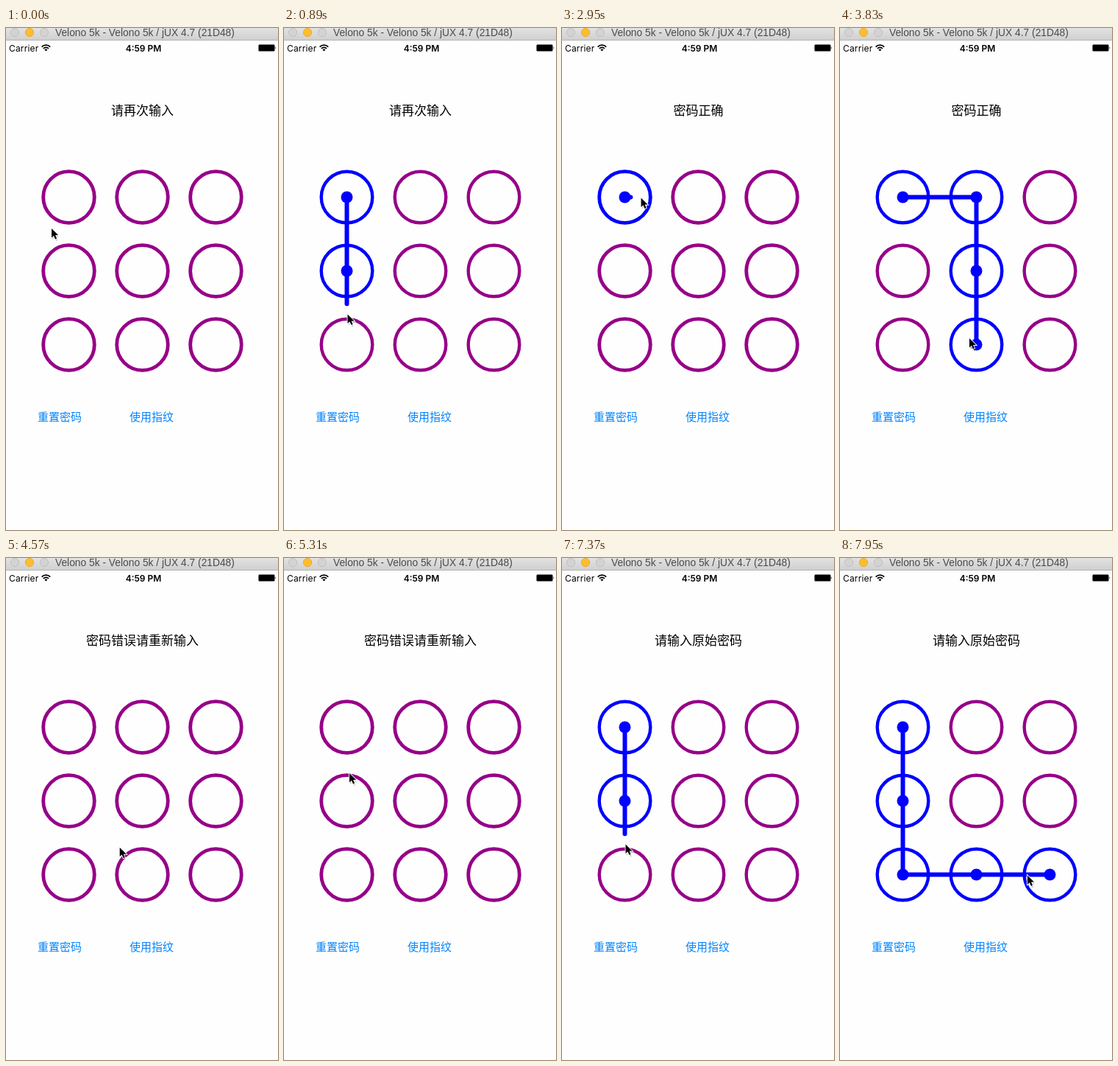
Write an HTML page that moves like this. It is 370 px wide and 681 px high and loops after 8 s.

```html
<!DOCTYPE html>
<html lang="zh-CN">
<head>
<meta charset="utf-8">
<style>
  html, body { margin: 0; width: 100%; height: 100%; overflow: hidden; background: #fefefe; }
  svg { display: block; width: 370px; height: 681px; }
  .cjk { font-family: "Noto Sans CJK SC", "Noto Sans CJK", sans-serif; }
  .status { font-family: Inter, sans-serif; font-size: 12px; }
  .link { font-size: 15px; fill: #0084ff; }
  #rings circle { fill: none; }
</style>
</head>
<body>
<svg viewBox="0 0 370 681">
  <defs>
    <linearGradient id="bar" x2="0" y2="1">
      <stop offset="0" stop-color="#e2e2e2"/>
      <stop offset="1" stop-color="#d0d0d0"/>
    </linearGradient>
  </defs>
  <rect width="370" height="681" fill="#fefefe"/>

  <!-- window bar -->
  <rect width="370" height="16" fill="url(#bar)"/>
  <rect y="16" width="370" height="1" fill="#b4b4b4"/>
  <g fill="#d3d3d3" stroke="#c0c0c0">
    <circle cx="12" cy="6" r="5.6"/>
    <circle cx="32" cy="6" r="5.6" fill="#fdbd2f" stroke="#e9ac2e"/>
    <circle cx="52" cy="6" r="5.6"/>
  </g>
  <text x="67" y="11" font-family="Liberation Sans, Arial, sans-serif" font-size="13.8" fill="#4b4b4b">Velono 5k - Velono 5k / jUX 4.7 (21D48)</text>

  <!-- status bar -->
  <text class="status" x="4" y="31.5" letter-spacing=".15">Carrier</text>
  <path d="M48.6 25.6a8 8 0 0 1 11.6 0M50.8 27.9a5 5 0 0 1 7.2 0" fill="none" stroke="#000" stroke-width="1.7"/>
  <path d="M54.4 31.6l-2-2.1a2.9 2.9 0 0 1 4 0z"/>
  <text class="status" x="187" y="31.5" text-anchor="middle" font-weight="600">4:59 PM</text>
  <rect x="343.5" y="22.5" width="22" height="9" rx="1.5" stroke="#777" stroke-width=".6"/>
  <path d="M366.5 25.2q1.6 1.8 0 3.6z"/>

  <text id="prompt" class="cjk" x="185.5" y="118.3" text-anchor="middle" font-size="17"></text>
  <g id="rings"></g>
  <polyline id="trail" fill="none" stroke="#00f" stroke-width="6" stroke-linecap="round" stroke-linejoin="round"/>
  <g id="dots" fill="#00f"></g>
  <text id="reset" class="cjk link" x="43" y="532.7">重置密码</text>
  <text class="cjk link" x="168" y="532.7">使用指纹</text>

  <g id="cursor">
    <path d="M2 3v13l3-2.7 2.2 4.6 2.1-.9-2.1-4.4h4.1z" opacity=".2"/>
    <path d="M1 1v12.4l2.9-2.6 2.1 4.6 2.1-.9-2-4.4h4z" stroke="#fff" stroke-width="1.8" paint-order="stroke"/>
  </g>
</svg>
<script>
const LOOP = 8000, STEP = 147.15;
const PACE = 1.9;   // steps the finger needs from ring to ring
const REACH = 0.34; // a ring lights up this share of the way before its centre
const LAG = 0.25;   // steps the line trails the pointer
const $ = id => document.getElementById(id);
const center = i => [85.5 + i % 3 * 100, 229.5 + Math.floor(i / 3) * 100];

const STROKES = [
  { begin: 3, clear: 14, cells: [0, 3, 6, 7, 8] },
  { begin: 19.6, clear: 30, cells: [0, 1, 4, 7] },
  { begin: 47, clear: 99, cells: [0, 3, 6, 7, 8] }
];
const arrival = (stroke, i) => stroke.begin + i * PACE;

// pointer stops between strokes: [step, x, y]
const RESTS = [
  [0, 61, 271], [12, 277, 433], [13, 277, 433], [26, 175, 420], [29, 180, 432],
  [36, 88, 291], [38, 68, 530], [42, 68, 530], [46, 84, 225]
];
const path = STROKES
  .flatMap(s => s.cells.map((cell, i) => [arrival(s, i), ...center(cell)]))
  .concat(RESTS)
  .sort((a, b) => a[0] - b[0]);

const PROMPTS = [[0, '请再次输入'], [14, '密码正确'], [29, '密码错误请重新输入'], [41, '请输入原始密码']];
const PRESS = 40;

function addCircle(parent, i, r) {
  const c = document.createElementNS('http://www.w3.org/2000/svg', 'circle');
  const [x, y] = center(i);
  c.setAttribute('cx', x);
  c.setAttribute('cy', y);
  c.setAttribute('r', r);
  return parent.appendChild(c);
}
const rings = [], dots = [];
for (let i = 0; i < 9; i++) {
  rings.push(addCircle($('rings'), i, 34.8));
  dots.push(addCircle($('dots'), i, 8));
}

function pointer(step) {
  const next = path.findIndex(p => p[0] > step);
  const [a, ax, ay] = path[next - 1], [b, bx, by] = path[next];
  const f = (step - a) / (b - a);
  return [ax + (bx - ax) * f, ay + (by - ay) * f];
}

function draw(step) {
  const stroke = STROKES.find(s => step >= s.begin && step < s.clear);
  const hit = stroke
    ? stroke.cells.filter((_, i) => step >= arrival(stroke, i && i - REACH))
    : [];
  const points = hit.map(center);
  if (stroke && step < arrival(stroke, stroke.cells.length - 1)) points.push(pointer(step - LAG));
  $('trail').setAttribute('points', points.join(' '));

  const width = hit.length > 1 ? 4.4 : 4.8;
  rings.forEach((ring, i) => {
    const on = hit.includes(i);
    ring.setAttribute('stroke', on ? '#00f' : '#960088');
    ring.setAttribute('stroke-width', width);
    dots[i].setAttribute('visibility', on ? 'visible' : 'hidden');
  });

  $('prompt').textContent = PROMPTS.filter(p => p[0] <= step).pop()[1];
  $('reset').setAttribute('opacity', step < PRESS ? 1 : Math.min(1, 0.25 + (step - PRESS) * 0.25));
  $('cursor').setAttribute('transform', `translate(${pointer(step)})`);
}

const start = performance.now();
let shown = -1;
function tick() {
  const step = Math.floor((performance.now() - start) % LOOP / STEP);
  if (step !== shown) draw(shown = step);
  requestAnimationFrame(tick);
}
tick();
</script>
</body>
</html>
```
